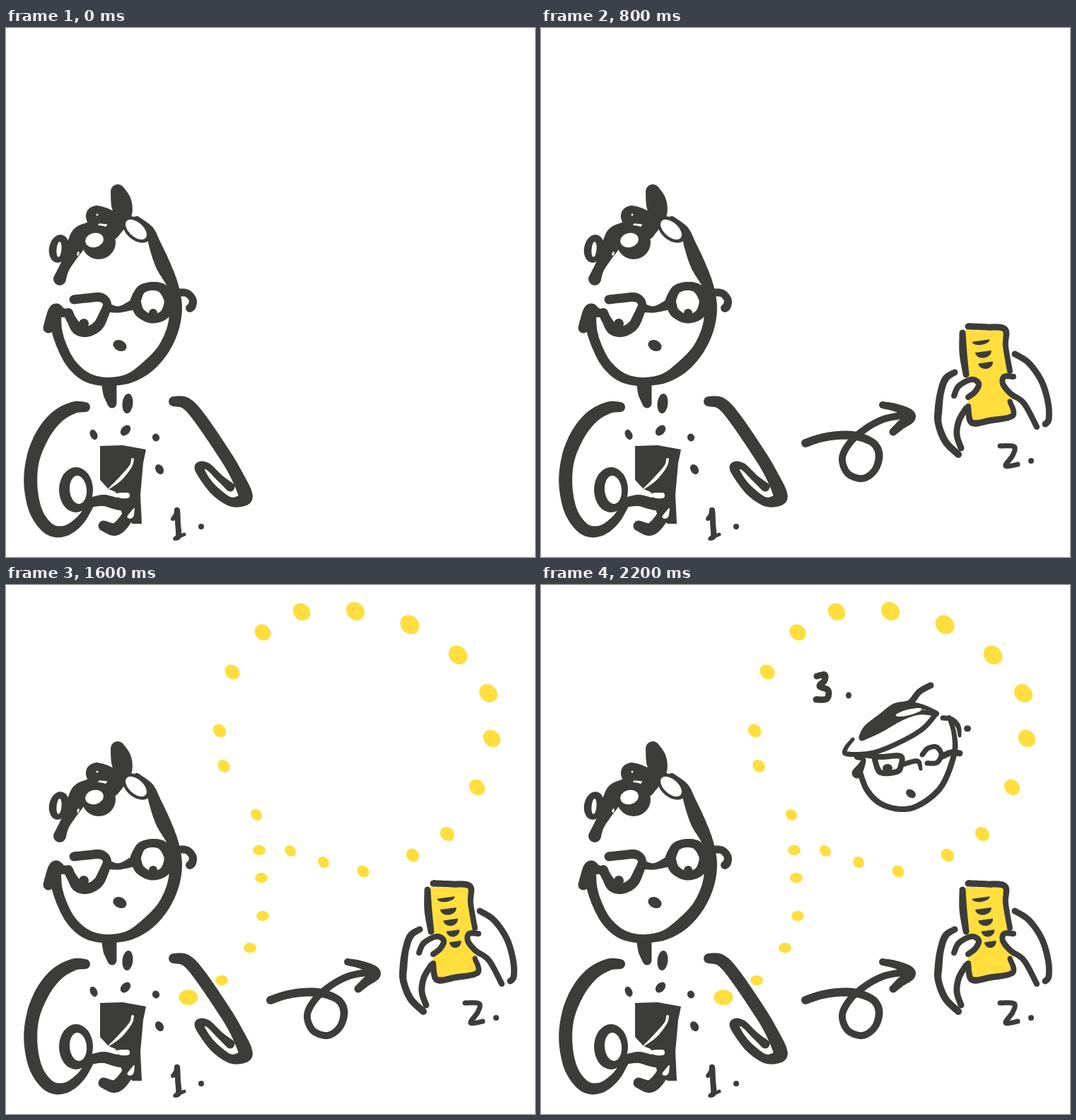
An HTML page with a canvas for the animation above (3600 ms loop, 748 by 748 pixels).

```html
<!DOCTYPE html>
<html lang="en">
<head>
<meta charset="utf-8">
<title>Three steps</title>
<style>
html, body { margin: 0; width: 100%; height: 100%; overflow: hidden; background: #fff; }
canvas { display: block; width: 100vw; height: 100vh; }
</style>
</head>
<body>
<canvas id="stage"></canvas>
<script>
const INK = '#3c3c3b', YELLOW = '#ffde3e', WHITE = '#fff';
const SIZE = 748, LOOP = 3600;
const canvas = document.getElementById('stage');
const ctx = canvas.getContext('2d');
const scale = window.devicePixelRatio || 1;
canvas.width = canvas.height = SIZE * scale;

const points = text => text.trim().split(/\s+/).map(s => s.split(',').map(Number));

// Catmull-Rom value between b and c
const spline = (a, b, c, d, u) =>
  b + u / 2 * (c - a + u * (2 * a - 5 * b + 4 * c - d + u * (3 * (b - c) + d - a)));

// A part is a list of [path, colour] painted in order
function makePart(build) {
  const ops = [];
  const fill = (path, colour) => ops.push([path, colour]);
  const pen = {
    // Round brush through "x,y,width" points; a missing width repeats the last one
    brush(text, colour = INK) {
      const p = points(text);
      p.forEach((q, i) => { if (q.length < 3) q.push(p[i - 1][2]); });
      const at = i => p[Math.max(0, Math.min(p.length - 1, i))];
      const path = new Path2D();
      for (let i = 0; i < p.length - 1; i++) {
        const steps = Math.ceil(Math.hypot(p[i + 1][0] - p[i][0], p[i + 1][1] - p[i][1]));
        for (let k = 0; k <= steps; k++) {
          const [x, y, w] = [0, 1, 2].map(j =>
            spline(at(i - 1)[j], p[i][j], p[i + 1][j], at(i + 2)[j], k / steps));
          path.moveTo(x + w / 2, y);
          path.arc(x, y, w / 2, 0, 2 * Math.PI);
        }
      }
      fill(path, colour);
    },
    poly(text, colour = INK) {
      fill(new Path2D('M' + text.trim().replace(/\s+/g, 'L') + 'Z'), colour);
    },
    oval(x, y, rx, ry = rx, turn = 0, colour = INK, end = 360) {
      const path = new Path2D();
      path.ellipse(x, y, rx, ry, turn * Math.PI / 180, 0, end * Math.PI / 180);
      fill(path, colour);
    }
  };
  build(pen);
  return ops;
}

const man = makePart(({ brush, poly, oval }) => {
  // head, ears, neck
  brush(`185,270,8 203,285,11 210,305,17 222,335,21 236,365,16 240,395,18 236,425,17
    222,455,17 200,479,18 175,495,14 148,500,12 126,498,13 108,490,14 91,473,14 79,450,14
    72,428,15 69,404,18`);
  brush('60,424,15 69,399,17 78,402,14 90,404,10');
  brush('243,374,11 256,375 264,384 263,393,12 260,396');
  brush('146,506,21 147,517,19 150,531,13');
  // hair
  brush('158,231,20 163,247,29 164,265,26 150,288,22');
  brush('76,355,18 82,340,15 92,322,18 101,302,26 105,289,19 122,278,14 127,264,25 155,270,18');
  oval(75, 312, 14, 20, 12);
  oval(75, 313, 3.5, 11, 5, WHITE);
  oval(131, 303, 24, 24);
  oval(125, 300, 13, 10, -15, WHITE);
  oval(185, 285, 23, 15, 40);
  oval(184, 285, 18, 10, 42, WHITE);
  oval(129, 264, 1.5, 1.5, 0, WHITE);
  oval(102, 319, 1.5, 3, 20, WHITE);
  // glasses
  brush(`96,384,13 115,382 134,381 143,390,12 138,406,14 130,421,15 116,429 102,426,17
    93,413,14 88,403`);
  oval(110, 418, 7, 7);
  brush('146,396,12 160,398,9 178,392,14');
  brush(`183,386,15 191,370,13 207,365,12 222,369,14 232,386,17 224,405,14 206,411,13
    189,402,14 183,386,15`);
  oval(208, 403, 6, 6);
  oval(161, 449, 10, 7.5, 25);
  // buttons and crumbs
  oval(172, 531, 7.5, 14, 6);
  oval(169, 569, 8.5, 6, -48);
  oval(124, 575, 5, 7.5, -25);
  oval(212, 579, 5, 5.5, -30);
  oval(217, 624, 5.5, 7.5, -30);
  // left arm, hand and phone
  brush(`112,536,14 95,537,17 72,550,19 52,575,20 38,610,19 35,648 43,685,18 62,709,17
    84,711,15 104,697,13 118,677,10`);
  oval(99, 653, 24, 32);
  oval(102, 653, 12, 20, -5, WHITE);
  poly('133,591 165,590 198,596 194,615 190,660 192,701 179,701 165,690 155,656 145,652 133,639');
  brush('119,671,14 138,668,16 158,673,17 180,676,16');
  brush('138,704,15 154,709,18 167,698 175,682,15');
  brush('179,610,4 176,620 162,637,5 146,651,2', WHITE);
  brush('153,660,3 164,661,8 171,661', WHITE);
  brush('181,680,2 177,689,7 174,691,5', WHITE);
  // right arm
  brush(`237,528,14 255,531,17 275,553,18 309,603 325,630 338,658,20 336,667,18 318,670,13
    298,657 283,640,12 273,621,13 285,620,10 302,636 317,649,13`);
  // step number
  brush('236,694,6 240,688 242,682,8 243,700 244,718 239,722,5 252,716');
  oval(276, 705, 4);
});

const hands = makePart(({ brush, poly, oval }) => {
  // looping arrow
  brush(`374,587,12 395,580 420,576 446,577 470,587,11 478,604 472,625,10 455,637 434,630
    426,608 438,585 460,566 485,553 510,548`);
  brush('483,533,10 505,538,12 522,549,16 508,562,13 498,571,11');
  // phone
  poly('600,427 657,428 664,490 652,497 655,510 667,520 667,548 610,557 603,528 620,508 599,490',
    YELLOW);
  brush('604,422,9 630,423 656,426 657,450,8 663,485');
  brush('596,431,9 597,460,11 601,490,9');
  brush('604,535,8 609,558,9 635,555 667,548,8 663,528,7');
  // left hand
  brush('584,520,8 591,506 609,497 619,503 614,514 604,522');
  brush('585,487,9 572,496,10 565,516 562,540,11 562,560,10 572,585 590,603');
  brush('601,538,9 591,555 588,575 594,594');
  // right hand
  brush('668,493,8 655,493 653,503 664,517 683,531 701,564');
  brush('670,461,9 690,474 708,500 717,530 718,553 713,560');
  // step number
  brush('649,591,7 669,592 667,604 657,619 674,617');
  oval(693, 612, 4);
});

const face = makePart(({ brush, poly, oval }) => {
  brush('577,187,6 584,210,7 584,240,8 566,285 535,311 508,317 480,309 461,290 451,265');
  brush('448,242,11 456,248,7 447,266,15');
  // cap
  brush('551,142,9 535,151 521,167 500,172 480,187 462,203,12 454,215,9');
  poly('452,214 475,186 512,165 545,174 500,191 480,208');
  brush('454,216,9 480,204 510,188,7 535,180 560,182,6 540,172 520,167');
  oval(520, 180, 19, 4, -14, WHITE);
  brush('441,218,5 431,231,6 433,239,7 470,237 510,221 540,203 558,183');
  brush('568,188,7 581,190 590,200 592,213,5');
  oval(603, 203, 5, 4.5);
  // glasses
  brush('457,240,8 480,243 508,242 509,255 503,264 480,265 472,247');
  oval(490, 259, 7, 6);
  brush('511,254,7 532,249 537,260,5');
  brush('539,240,7 547,231 559,229 566,239 560,251 546,252');
  brush('568,242,9 580,237 592,238');
  oval(523, 295, 7.5, 5.5, 35);
  // step number
  brush('390,129,9 401,127 401,135 394,143 406,149 404,161 389,162');
  oval(435, 156, 4, 4.5);
});

const bars = [0, 1, 2, 3, 4].map(i => makePart(({ oval }) =>
  oval(622 + 3.3 * i, 442 + 15.5 * i, 12.5 - i, i ? 9 : 6, -8, INK, 180)));

const trail = makePart(({ oval }) => {
  points('358,375 361,414 363,468 345,513 305,559 258,583').forEach(([x, y], i) => {
    const r = i < 5 ? 9 : 13.5;
    oval(x, y, r, r * 0.8, 0, YELLOW);
  });
});

// Ring dots grow towards the upper right
const ring = makePart(({ oval }) => {
  points(`418,38 494,37 571,56 639,99 682,153 687,217 666,286 624,352 575,382 505,405
    449,392 402,376 354,325 308,256 302,206 320,123 363,67`).forEach(([x, y]) => {
    const angle = Math.atan2(y - 220, x - 494);
    const r = 11.5 + 3 * Math.cos(angle + 1);
    oval(x, y, r, r * 0.85, 45, YELLOW);
  });
});

function paint(part) {
  for (const [path, colour] of part) {
    ctx.fillStyle = colour;
    ctx.fill(path);
  }
}

function draw() {
  const t = performance.now() % LOOP;
  ctx.setTransform(scale, 0, 0, scale, 0, 0);
  ctx.fillStyle = WHITE;
  ctx.fillRect(0, 0, SIZE, SIZE);
  paint(man);
  if (t >= 400) paint(hands);
  bars.forEach((bar, i) => { if (t >= 400 + 200 * i) paint(bar); });
  if (t >= 1400) paint(trail);
  if (t >= 1600) paint(ring);
  if (t >= 2200 || (t >= 1800 && t < 2000)) paint(face);
  requestAnimationFrame(draw);
}
draw();
</script>
</body>
</html>
```
